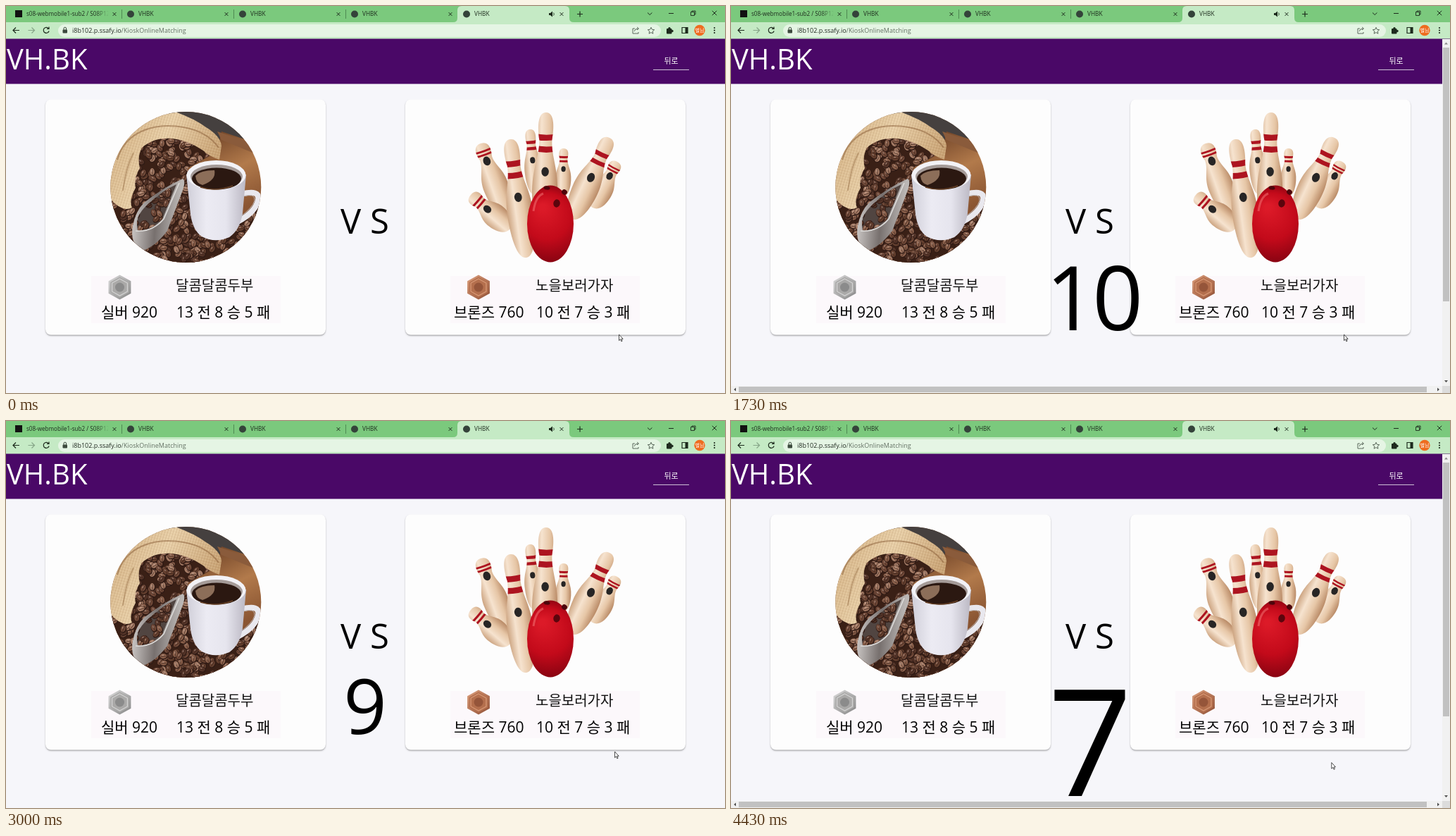
Recreate the animation shown at these times as an HTML page with a canvas. Size 1021x549 px, loop 4460 ms.

```html
<!DOCTYPE html>
<html lang="ko">
<head>
<meta charset="utf-8">
<title>Match countdown</title>
<style>
html, body { margin: 0; width: 100%; height: 100%; overflow: hidden; background: #f6f6fa; }
canvas { display: block; width: 1021px; height: 549px; }
</style>
</head>
<body>
<canvas id="stage" width="1021" height="549"></canvas>
<script>
const W = 1021, H = 549, LOOP = 4460, TAU = Math.PI * 2;
const FONT = '"Open Sans", "Noto Sans CJK KR", "Noto Sans CJK JP", sans-serif';
const view = document.getElementById('stage').getContext('2d');
const page = document.createElement('canvas');
page.width = W;
page.height = H;
let g = page.getContext('2d');

// ---- drawing helpers ----
function text(str, x, y, size, color = '#000', align = 'left') {
  g.font = `${size}px ${FONT}`;
  g.textAlign = align;
  g.fillStyle = color;
  g.fillText(str, x, y);
}

function rect(x, y, w, h, color) {
  g.fillStyle = color;
  g.fillRect(x, y, w, h);
}

function round(x, y, w, h, r, color) {
  g.fillStyle = color;
  g.beginPath();
  g.roundRect(x, y, w, h, r);
  g.fill();
}

function oval(x, y, rx, ry, color, angle = 0) {
  g.fillStyle = color;
  g.beginPath();
  g.ellipse(x, y, rx, ry, angle, 0, TAU);
  g.fill();
}

function shape(d, color) {
  g.fillStyle = color;
  g.fill(new Path2D(d));
}

function line(d, color = '#1d2b1d', width = 1.2) {
  g.strokeStyle = color;
  g.lineWidth = width;
  g.stroke(new Path2D(d));
}

function clipped(d, draw) {
  g.save();
  g.clip(new Path2D(d));
  draw();
  g.restore();
}

function fade(x0, y0, x1, y1, ...colors) {
  const grad = g.createLinearGradient(x0, y0, x1, y1);
  colors.forEach((c, i) => grad.addColorStop(i / (colors.length - 1), c));
  return grad;
}

function randomFrom(seed) {
  return () => (seed = (seed * 16807) % 2147483647) / 2147483647;
}

// ---- browser frame ----
function cross(x, y, r) {
  line(`M${x - r} ${y - r}l${2 * r} ${2 * r}M${x + r} ${y - r}l${-2 * r} ${2 * r}`, '#1d2b1d', 1);
}

function drawTabs() {
  rect(0, 0, W, 23, '#7bc97d');
  shape('M635 23Q641 23 641 17V6Q641 0 647 0H794Q800 0 800 6V17Q800 23 806 23Z', '#c5eac5');
  rect(13, 6, 10, 10, '#111');
  text('s08-webmobile1-sub2 / S08P12', 29, 14, 8.1, fade(128, 0, 146, 0, '#1d2b1d', 'rgba(29,43,29,0)'));
  for (let i = 0; i < 4; i++) {
    const x = 177 + 159 * i;
    oval(x, 11.5, 5, 5, '#34433a');
    text('VHBK', x + 11, 14, 8.3, '#1d2b1d');
    if (i < 3) rect(x - 13, 5, 1, 13, '#4f8a52');
  }
  [154, 313, 472, 631, 789].forEach(x => cross(x, 11.5, 2.4));
  shape('M771 10h2l3-2.5v8l-3-2.5h-2z', '#1d2b1d');
  line('M777.5 9.5q1.5 2 0 4', '#1d2b1d', 0.9);
  line('M811 11.5h8M815 7.5v8');
  line('M911 9.5l3.2 3 3.2-3M941 10.5h7', '#1d2b1d', 1);
  line('M972.5 8.5h5v5h-5zM974 8.5v-1.5h5v5h-1.5', '#1d2b1d', 0.9);
  cross(1006, 10, 3.2);
}

function drawToolbar() {
  rect(0, 23, W, 24, '#c5eac5');
  round(74, 26, 856, 18, 9, '#e5f5e4');
  line('M19 34.5h-9M14 30.5l-4 4 4 4');
  line('M31.5 34.5h9M36.5 30.5l4 4-4 4', '#86a588');
  line('M60.5 32a4 4 0 1 0 .6 3.5M61 29.5v3h-3');
  round(80.5, 33.5, 6.5, 5, 1, '#3c4a3d');
  line('M82 34v-2a1.8 1.8 0 0 1 3.6 0v2', '#3c4a3d', 1);
  text('i8b102.p.ssafy.io', 94, 38, 9, '#202a20');
  text('/KioskOnlineMatching', 94 + g.measureText('i8b102.p.ssafy.io').width, 38, 9, '#637063');
  line('M893 32h-3v7h8v-2M892 36q1-4 6-4M896 30l2.5 2-2.5 2', '#4d5b4e', 0.9);
  line('M916 30.3l1.4 3 3.3.4-2.5 2.2.7 3.3-2.9-1.7-2.9 1.7.7-3.3-2.5-2.2 3.3-.4z', '#4d5b4e', 0.9);
  round(938, 32, 7.5, 7.5, 1, '#1d2b1d');
  oval(942, 31.8, 1.7, 1.7, '#1d2b1d');
  oval(946, 35.5, 1.7, 1.7, '#1d2b1d');
  line('M960 30.5h8v8h-8z');
  rect(964.5, 30.5, 3.5, 8, '#1d2b1d');
  oval(985, 34.5, 7.7, 7.7, '#ee6c1f');
  text('별님', 985, 37, 7, '#fff', 'center');
  [31, 34.5, 38].forEach(y => oval(1006, y, 1.1, 1.1, '#1d2b1d'));
}

// ---- coffee picture ----
function drawBeans(count, seed, x0, y0, w, h) {
  const rnd = randomFrom(seed);
  const tones = ['#553529', '#714a39', '#8a604b', '#a37a64', '#65402f'];
  for (let i = 0; i < count; i++) {
    const x = x0 + rnd() * w, y = y0 + rnd() * h, a = rnd() * TAU;
    oval(x, y, 5.8, 4.2, '#2f1a14', a);
    oval(x - 0.4, y - 0.5, 5, 3.4, tones[Math.floor(rnd() * 5)], a);
    const dx = Math.cos(a) * 4, dy = Math.sin(a) * 4;
    line(`M${x - dx} ${y - dy}L${x + dx} ${y + dy}`, '#3a2119', 0.7);
    oval(x - 1, y - 1.8, 1.6, 0.7, 'rgba(225,198,184,.5)', a);
  }
}

function drawCoffee() {
  g.save();
  g.beginPath();
  g.arc(255.3, 257, 107, 0, TAU);
  g.clip();
  rect(145, 148, 220, 218, fade(300, 180, 350, 280, '#74472a', '#b27a4b', '#8a5532'));
  shape('M220 145H365V198L306 178L300 205Z', '#45403f');
  shape('M300 178L365 200V214L306 190Z', '#8a5b3b');

  clipped('M145 290L178 200 215 180 270 186 290 212 258 230 268 285 330 300 365 280V368H145Z', () => {
    rect(145, 150, 220, 218, '#3a2016');
    drawBeans(720, 417, 145, 176, 218, 192);
  });

  const sack = 'M145 150H240Q268 160 284 172Q304 184 306 198L303 218Q288 213 280 205Q258 190 236 188'
    + 'Q210 186 193 201Q186 214 190 230Q181 244 184 258Q174 276 179 286Q164 294 145 270Z';
  shape(sack, fade(150, 160, 290, 230, '#d0ac7e', '#e8cfa8', '#c9a375'));
  clipped(sack, () => {
    for (let k = 0; k < 60; k++) {
      line(`M${120 + k * 4} 150l-44 140`, 'rgba(120,82,45,.15)', 1);
      line(`M145 ${120 + k * 4}l165 40`, 'rgba(255,238,205,.2)', 1);
    }
  });
  line('M158 218Q166 190 192 178T252 172T302 201', 'rgba(135,93,54,.5)', 2);
  line('M166 262Q170 230 181 208', 'rgba(135,93,54,.4)', 2);

  shape('M251 245Q256 248 250 264L229 319Q210 344 190 348Q176 334 180 312Q184 291 196 279Q224 257 251 245Z',
    fade(180, 300, 245, 305, '#c9c5c3', '#77706e', '#bbb7b5'));
  clipped('M242 253L222 302Q205 320 187 318Q182 298 201 282Q224 261 242 253Z', () => {
    rect(175, 250, 70, 72, '#514541');
    drawBeans(60, 88, 182, 250, 50, 66);
  });
  line('M184 319Q208 321 224 302L246 251', '#dddbd9', 1.6);

  line('M334 267Q361 260 358 275Q355 292 329 306', '#e9e8ee', 8);
  line('M335 270Q355 265 353 276Q350 287 331 300', '#b9b2b2', 1);
  shape('M256 239L262 295Q265 318 278 327Q297 337 317 328Q332 318 336 294L341 239Z',
    fade(257, 0, 340, 0, '#d0cfd9', '#ecebf3', '#e6e5ee', '#bcb9c4'));
  oval(298.5, 240, 42, 21, '#f3f2f6');
  oval(299, 242, 37, 17, '#a59b98');
  oval(299, 245, 35, 15.5, '#2b1811');
  shape('M269 241Q276 233 296 233Q299 247 279 254Q270 252 269 241Z', '#8c6e59');
  line('M276 257Q298 264 322 255', '#674126', 1.5);
  g.restore();
}

// ---- bowling picture ----
function drawPin(x0, y0, x1, y1, w, dot) {
  const len = Math.hypot(x1 - x0, y1 - y0);
  const side = (s) => `C${s * w * .34} 0 ${s * w * .33} ${len * .12} ${s * w * .25} ${len * .22}`
    + `C${s * w * .24} ${len * .36} ${s * w * .53} ${len * .44} ${s * w * .5} ${len * .66}`
    + `C${s * w * .48} ${len * .82} ${s * w * .35} ${len} 0 ${len}`;
  g.save();
  g.translate(x0, y0);
  g.rotate(Math.atan2(y1 - y0, x1 - x0) - Math.PI / 2);
  const body = `M0 0${side(1)}L0 0${side(-1)}Z`;
  shape(body, fade(-w / 2, 0, w / 2, 0, '#cda582', '#f6e3cf', '#e6c6a6', '#b98a66'));
  // the two bands sit between head and dot
  clipped(body, () => {
    for (const k of [.4, .6]) {
      const y = len * dot * k;
      line(`M${-w / 2} ${y}Q0 ${y + len * .025} ${w / 2} ${y}`, '#ad1420', len * dot * .1);
    }
  });
  const r = w * .145;
  oval(0, len * dot, r, r * 1.25, '#272525');
  g.restore();
}

function drawBowling() {
  const pins = [
    [744, 175, 752, 268, 25, .47],
    [792, 202, 791, 270, 22, .43],
    [767, 151, 764, 330, 36, .47],
    [868, 221, 833, 286, 31, .31],
    [674, 195, 708, 291, 36, .26],
    [660, 268, 716, 316, 34, .42],
    [857, 187, 803, 302, 37, .49],
    [716, 189, 739, 357, 37, .49]
  ];
  pins.forEach(p => drawPin(...p));
  const skin = g.createRadialGradient(762, 285, 4, 773, 309, 57);
  skin.addColorStop(0, '#dc1a28');
  skin.addColorStop(.55, '#c30a1a');
  skin.addColorStop(1, '#850311');
  oval(773, 309, 33, 54.5, skin);
  oval(768, 258, 4.5, 2.6, '#4d050c', .1);
  oval(793, 264, 4, 3.6, '#4d050c', .6);
  oval(782, 280, 4.7, 5.7, '#5b050d', .2);
  line('M749 291Q752 270 763 266', 'rgba(255,150,145,.4)', 3);
}

// ---- web page ----
function drawBadge(x, y, light, mid, dark) {
  const hex = (r) => {
    const p = [];
    for (let i = 0; i < 6; i++) p.push(`${x + r * Math.sin(i * TAU / 6) * 1.05} ${y - r * Math.cos(i * TAU / 6)}`);
    return 'M' + p.join('L') + 'Z';
  };
  shape(hex(17.5), fade(x - 14, y - 14, x + 14, y + 14, light, dark));
  shape(hex(14.5), mid);
  line(hex(12), light, 1.2);
  oval(x, y, 6.5, 6.5, dark);
}

function drawCard(x) {
  g.save();
  g.shadowColor = 'rgba(0,0,0,.3)';
  g.shadowBlur = 2;
  g.shadowOffsetY = 1.5;
  round(x, 132.5, 398, 334, 8, '#fdfdfd');
  g.restore();
}

function drawPlayer(x, panelX, badge, name, nameX, tier, tierX, record, recordX) {
  drawCard(x);
  rect(panelX, 383, 269, 67, '#fcf8fb');
  drawBadge(...badge);
  text(name, nameX, 404, 20, '#111');
  text(tier, tierX, 441.5, 21);
  text(record, recordX, 441.5, 21);
}

function drawPage() {
  rect(0, 0, W, H, '#f6f6fa');
  drawTabs();
  drawToolbar();
  rect(0, 46.5, W, 64, '#4a0867');
  text('VH.BK', 1, 90, 40, '#fff');
  text('뒤로', 944.5, 82, 11, '#fff', 'center');
  rect(919, 90, 51, 1, '#cdbfd6');
  drawPlayer(56, 121, [161.5, 399, '#d4d4d4', '#aaa9a8', '#8b8b8b'],
    '달콤달콤두부', 241, '실버 920', 135, '13 전 8 승 5 패', 242);
  drawPlayer(567, 631, [671, 399, '#d89a78', '#b46f4d', '#95553a'],
    '노을보러가자', 752, '브론즈 760', 636, '10 전 7 승 3 패', 753);
  drawCoffee();
  drawBowling();
  text('V S', 475, 323, 49);
}

// ---- moving parts ----
function ease(p) {
  const curve = (u, a, b) => 3 * u * (1 - u) ** 2 * a + 3 * u * u * (1 - u) * b + u ** 3;
  let lo = 0, hi = 1;
  for (let i = 0; i < 24; i++) {
    const mid = (lo + hi) / 2;
    if (curve(mid, .25, .25) < p) lo = mid; else hi = mid;
  }
  return curve(lo, .1, 1);
}

// [label, shown from, shrink start, scrollbars until]
const COUNTS = [
  ['10', 1000, 1065, 1900],
  ['9', 2065, 2065, 2495],
  ['8', 3075, 3075, 3510],
  ['7', 4095, 4095, 4520]
];

function drawCount(label, p) {
  const size = 107 + 247 * (1 - ease(p));
  const y = 353 + 0.85 * size;
  if (label.length > 1) {
    const x = 508.3 - 0.49 * size;
    text(label[0], x, y, size);
    text(label[1], x + 0.53 * size, y, size);
  } else {
    text(label, 510, y, size, '#000', 'center');
  }
}

function drawScrollbars() {
  rect(1010, 47, 11, 502, '#f1f1f1');
  rect(0, 539, 1021, 10, '#f1f1f1');
  rect(1010, 539, 11, 10, '#dcdcdc');
  rect(1011, 59, 9, 360, '#c1c1c1');
  rect(11, 540, 977, 8, '#c1c1c1');
  shape('M1013 54.5l2.5-3 2.5 3z', '#8a8a8a');
  shape('M1013 531l2.5 3 2.5-3zM7 541.5v5l-3-2.5zM1003 541.5v5l3-2.5z', '#505050');
}

const PATH = [[0, 870, 466], [2650, 870, 466], [3000, 864, 469], [3600, 861, 472], [LOOP, 852, 485]];

function drawCursor(t) {
  const i = PATH.findIndex(p => p[0] > t);
  const [t0, x0, y0] = PATH[i - 1], [t1, x1, y1] = PATH[i];
  const k = (t - t0) / (t1 - t0);
  g.save();
  g.translate(x0 + (x1 - x0) * k, y0 + (y1 - y0) * k);
  const arrow = 'M.5 0V8.6L2.5 6.8 3.8 9.8 5.1 9.2 3.8 6.3H6.2Z';
  shape(arrow, '#fff');
  line(arrow, '#222', 0.8);
  g.restore();
}

function frame() {
  const t = performance.now() % LOOP;
  g.drawImage(page, 0, 0);
  const now = COUNTS.findLast(c => t >= c[1]);
  if (now) {
    const [label, , start, barsEnd] = now;
    drawCount(label, Math.min(1, Math.max(0, (t - start) / 1000)));
    if (t < barsEnd) drawScrollbars();
  }
  drawCursor(t);
  requestAnimationFrame(frame);
}

drawPage();
g = view;
frame();
</script>
</body>
</html>
```
